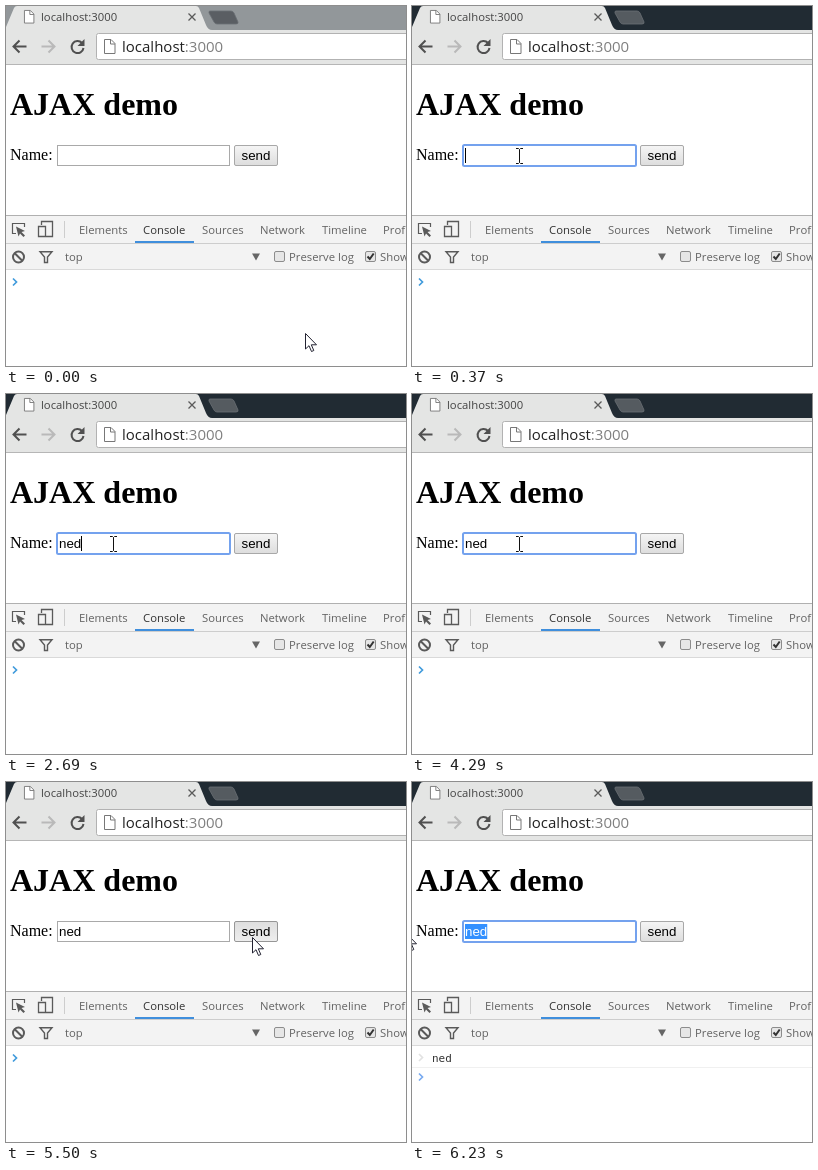
Recreate the animation shown at these times as an HTML page. Size 400 px wide and 360 px high, loop 8 s.

```html
<!DOCTYPE html>
<html lang="en">
<head>
<meta charset="utf-8">
<title>AJAX demo</title>
<style>
  html, body { margin: 0; width: 100%; height: 100%; overflow: hidden; background: #fff; }
  svg { display: block; width: 100%; height: 100%; font-kerning: none; }
  .ui { font-family: "Open Sans", "Noto Sans", sans-serif; font-size: 11.3px; fill: #626262; }
  .page { font-family: "Liberation Serif", "Times New Roman", serif; font-size: 16px; }
  .form { font-family: "Liberation Sans", Arial, sans-serif; font-size: 13.333px; }
  .mono { font-family: "DejaVu Sans Mono", monospace; font-size: 11px; fill: #303030; }
  .line { fill: none; stroke: #5a5a5a; }
  .chrome { fill: #e4e5e4; }
  text { white-space: pre; }
</style>
</head>
<body>
<svg viewBox="0 0 400 360" xmlns="http://www.w3.org/2000/svg">
  <defs>
    <linearGradient id="face" x2="0" y2="1"><stop stop-color="#f5f5f5"/><stop offset="1" stop-color="#dddddd"/></linearGradient>
    <linearGradient id="faceHover" x2="0" y2="1"><stop stop-color="#f8f8f8"/><stop offset="1" stop-color="#e2e2e2"/></linearGradient>
    <linearGradient id="facePressed" x2="0" y2="1"><stop stop-color="#dedede"/><stop offset="1" stop-color="#eeeeee"/></linearGradient>
    <clipPath id="selectionClip"><rect id="selectionBox" y="142" height="15"/></clipPath>
    <g id="document">
      <path d="M.5 .5H7L11 4.5V14.5H.5Z" fill="#fff" stroke="#777"/>
      <path d="M6.5 .5V5H11" fill="none" stroke="#777"/>
    </g>
    <path id="chevron" d="M0 0L3.5 3.5L0 7" fill="none" stroke-width="1.7"/>
  </defs>

  <!-- Browser window -->
  <rect id="strip" width="400" height="24"/>
  <path class="chrome" d="M0 24V21L8 2Q9 0 11 0H190Q192 0 193 2L200 19Q202 24 206 24Z"/>
  <path id="newTab" d="M204 5H225Q227 5 228 7L232 16Q232.500 18 230 18H211Q209 18 208 16L203 7Q202.500 5 204 5Z" stroke="#6a6f74" stroke-width=".8"/>
  <rect class="chrome" y="24" width="400" height="34"/>
  <path d="M0 58.500H400" stroke="#b6b6b6"/>
  <use href="#document" transform="translate(18 4) scale(.9)"/>
  <text class="ui" x="35" y="15" style="fill:#444">localhost:3000</text>
  <path class="line" d="M182.500 7.500L189.500 14.500M189.500 7.500L182.500 14.500" stroke-width="1.300"/>
  <g fill="none" stroke-width="2">
    <path d="M20.500 40.500H8M13.500 34.500L7.500 40.500L13.500 46.500" stroke="#505050"/>
    <path d="M35.500 40.500H48M42.500 34.500L48.500 40.500L42.500 46.500" stroke="#b9b9b9"/>
    <path d="M76 37A6 6 0 1 0 77.500 42" stroke="#505050"/>
  </g>
  <path d="M78.500 33V40H71.500Z" fill="#505050"/>
  <rect x="90.500" y="27.500" width="320" height="26" rx="2" fill="#fff" stroke="#b2b2b2"/>
  <use href="#document" x="98" y="33"/>
  <text class="ui" x="116" y="46" style="font-size:15px;fill:#222">localhost<tspan fill="#808080">:3000</tspan></text>

  <!-- Page -->
  <text class="page" x="4" y="109" style="font-size:32px;font-weight:bold">AJAX demo</text>
  <text class="page" x="4" y="154">Name:</text>
  <rect id="field" fill="#fff"/>
  <g class="form">
    <text id="value" x="53" y="154">ned</text>
    <g clip-path="url(#selectionClip)">
      <rect x="53" y="142" width="23" height="15" fill="#3390ff"/>
      <text x="53" y="154" fill="#fff">ned</text>
    </g>
    <rect id="caret" y="142" width="1" height="15"/>
    <rect id="button" x="228.500" y="139.500" width="43" height="20" rx="1.500"/>
    <text x="235.500" y="154">send</text>
  </g>

  <!-- Developer tools -->
  <rect y="209" width="400" height="55" fill="#f3f3f3"/>
  <path d="M0 209.500H400" stroke="#b0b0b0"/>
  <path d="M0 237.500H400M58.500 215V232" stroke="#cdcdcd"/>
  <path d="M0 263.500H400" stroke="#d9d9d9"/>
  <rect x="129" y="235" width="59" height="2" fill="#3f8edc"/>
  <path class="line" d="M10 227.500H6.500V217.500H18.500V221" stroke-width="1.200"/>
  <path d="M10 220.500L19 225L15.500 226L19 229.500L17.500 231L14 227.500L12.500 230.500Z" fill="#5a5a5a"/>
  <path class="line" d="M35.500 219V215.500H46.500V230.500H40M32.500 220.500H39.500V230.500H32.500Z" stroke-width="1.300"/>
  <g id="panels" class="ui"></g>
  <g class="line" stroke-width="2"><circle cx="12.500" cy="251" r="5.500"/><path d="M8.500 247L16.500 255"/></g>
  <path class="line" d="M34 245.700H46L41.500 251V256.500H38.500V251Z" stroke-width="1.400"/>
  <path d="M246 247.500H254L250 254.500Z" fill="#666"/>
  <g fill="#e6e6e6" stroke="#8c8c8c">
    <rect x="268.500" y="245.500" width="10" height="10" rx="1.500"/>
    <rect x="359.500" y="245.500" width="10" height="10" rx="1.500"/>
  </g>
  <path d="M361.500 250.500L363.800 253L367.700 247.500" fill="none" stroke="#333" stroke-width="2"/>
  <g class="ui">
    <text x="59" y="255">top</text>
    <text x="283" y="255">Preserve log</text>
    <text x="374" y="255">Show all messages</text>
  </g>
  <g id="logRow">
    <use href="#chevron" x="7" y="272" stroke="#e2e2e2"/>
    <text class="mono" x="20" y="280">ned</text>
    <path d="M0 285.500H400" stroke="#f0f0f0"/>
  </g>
  <use id="prompt" href="#chevron" x="7"/>

  <!-- Pointers -->
  <path id="arrow" d="M.5 .5V16L4 12.700L6.500 18.500L8.800 17.500L6.300 11.800H11.500Z" fill="#fff" stroke="#222231"/>
  <path id="beam" d="M-3 -7.500H-.5L.5 -6.500L1.500 -7.500H4M.5 -6.500V6.500M-3 7.500H-.5L.5 6.500L1.500 7.500H4" fill="none" stroke="#111"/>
</svg>
<script>
const LOOP = 8000;
const TYPED = 2690, PRESSED = 5500, LOGGED = 5560, DRAG = 6008;
const TEXT_LEFT = 53, TEXT_RIGHT = 75, LETTER = 7.41;

// Pointer stops: time, x, y, shape
const pointerStops = [
  [0, 299, 327, "arrow"], [50, 283, 312, "arrow"], [90, 231, 264, "arrow"],
  [130, 164, 203, "arrow"], [170, 121, 164, "arrow"], [210, 107, 150, "beam"],
  [4916, 120, 152, "beam"], [4972, 152, 156, "beam"], [5028, 194, 163, "arrow"],
  [5084, 226, 165, "arrow"], [5140, 236, 162, "arrow"], [5330, 246, 155, "arrow"],
  [5730, 239, 153, "arrow"], [5786, 213, 151, "beam"], [5841, 166, 150, "beam"],
  [5897, 118, 149, "beam"], [5952, 90, 149, "beam"], [6008, 79, 149, "beam"],
  [6063, 69, 149, "beam"], [6119, 49, 149, "beam"], [6174, 20, 150, "beam"],
  [6230, -7, 150, "arrow"]
];
const caretSpans = [[370, 1980], [2650, 4290], [4860, PRESSED], [DRAG, 6063]];

const $ = id => document.getElementById(id);
const set = (id, attributes) => {
  for (const name in attributes) $(id).setAttribute(name, attributes[name]);
};
const show = (id, visible) => set(id, { visibility: visible ? "visible" : "hidden" });

const panels = { Elements: 73, Console: 137, Sources: 196, Network: 254, Timeline: 316, Profiles: 377 };
$("panels").innerHTML = Object.entries(panels).map(([name, x]) =>
  `<text x="${x}" y="228"${name === "Console" ? ' style="fill:#333"' : ""}>${name}</text>`).join("");

function drawPointer(t) {
  const [, x, y, shape] = pointerStops.findLast(stop => stop[0] <= t);
  for (const id of ["arrow", "beam"]) show(id, id === shape);
  set(shape, { transform: `translate(${x} ${y})` });
  return x;
}

function drawWindow(active) {
  set("strip", { fill: active ? "#212b33" : "#92979a" });
  set("newTab", { fill: active ? "#555b60" : "#5a5e63" });
}

function drawField(t, pointerX) {
  const focused = t >= 370 && t < PRESSED || t >= DRAG;
  set("field", focused
    ? { x: 51, y: 139, width: 173, height: 21, rx: 1.5, stroke: "#74a2ee", "stroke-width": 2 }
    : { x: 51.5, y: 139.5, width: 172, height: 20, rx: 0, stroke: "#a9a9a9", "stroke-width": 1 });
  show("value", t >= TYPED);
  show("caret", caretSpans.some(([from, to]) => t >= from && t < to));
  set("caret", { x: t >= TYPED ? TEXT_RIGHT : TEXT_LEFT });

  const letters = t < DRAG ? 0 : Math.round((TEXT_RIGHT - pointerX) / LETTER);
  const width = Math.max(0, Math.min(3, letters)) * LETTER;
  set("selectionBox", { x: TEXT_RIGHT + .23 - width, width });
}

function drawButton(t) {
  const pressed = t >= PRESSED && t < LOGGED;
  const hovered = t >= 5330 && t < 5786;
  set("button", {
    fill: `url(#${pressed ? "facePressed" : hovered ? "faceHover" : "face"})`,
    stroke: hovered ? "#969696" : "#a8a8a8"
  });
}

function drawConsole(logged) {
  show("logRow", logged);
  set("prompt", { y: logged ? 291.5 : 272.5, stroke: logged ? "#78aaf0" : "#409bdc" });
}

const start = performance.now();
function frame() {
  const t = (performance.now() - start) % LOOP;
  const pointerX = drawPointer(t);
  drawWindow(t >= 370);
  drawField(t, pointerX);
  drawButton(t);
  drawConsole(t >= LOGGED);
  requestAnimationFrame(frame);
}
frame();
</script>
</body>
</html>
```
